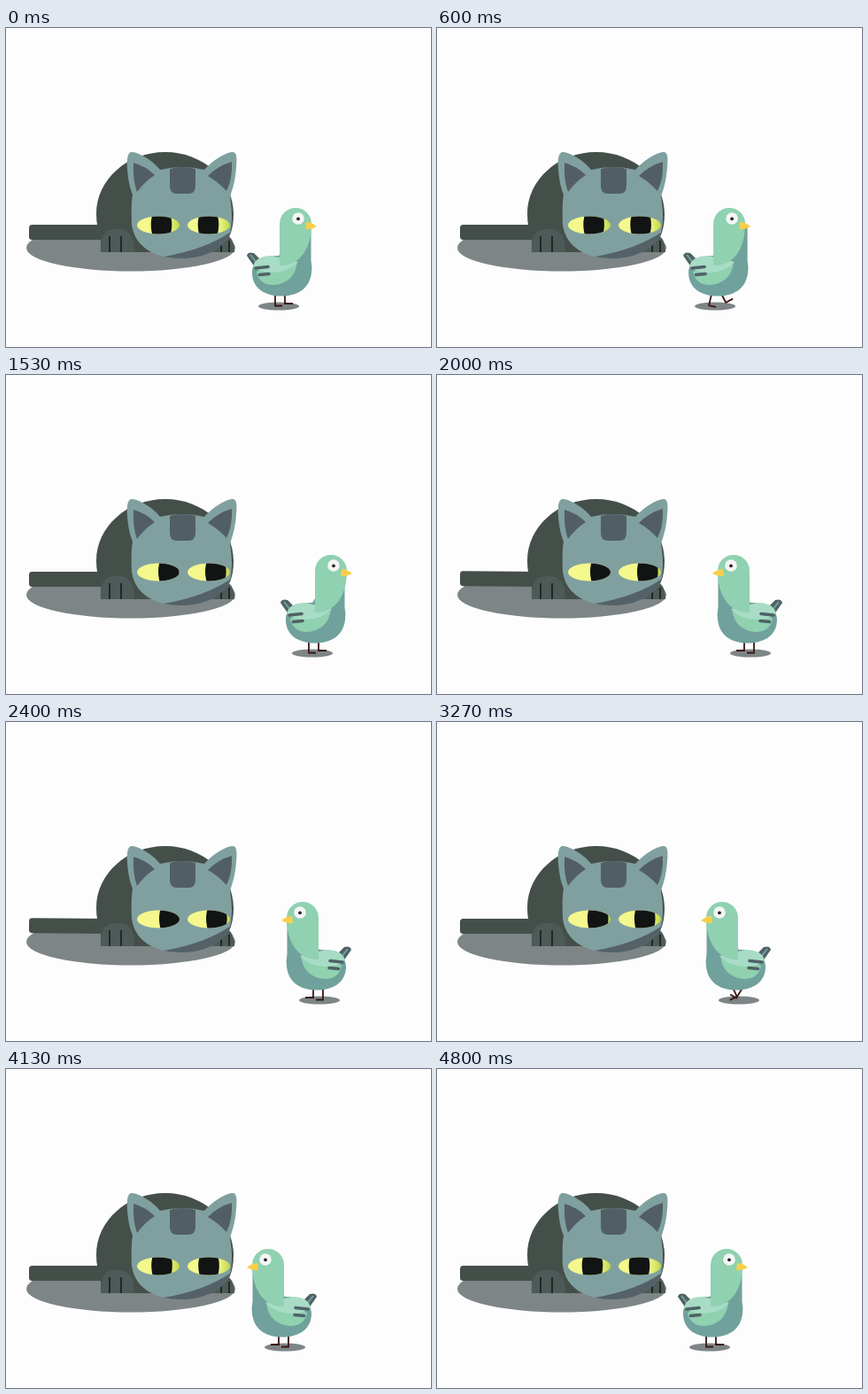
An HTML page that plays this animation: 480 by 360 pixels, repeating every 4.99 s.

```html
<!DOCTYPE html>
<html lang="en">
<head>
<meta charset="utf-8">
<title>Cat and pigeon</title>
<style>
html, body { margin: 0; width: 100%; height: 100%; overflow: hidden; background: #fdfdfd; }
svg { display: block; width: 100vw; height: 100vh; }
.leg { fill: none; stroke: #3a1614; stroke-width: 1.8; }
.quill { stroke: #4f6266; stroke-width: 3.6; stroke-linecap: round; }
</style>
</head>
<body>
<svg viewBox="0 0 480 360">
  <defs>
    <linearGradient id="iris">
      <stop offset=".72" stop-color="#f4f88c"/>
      <stop offset="1" stop-color="#c0d848"/>
    </linearGradient>
    <clipPath id="sockets">
      <ellipse cx="172" cy="222.5" rx="24" ry="10"/>
      <ellipse cx="229" cy="222.5" rx="24" ry="10"/>
    </clipPath>
  </defs>

  <g id="cat">
    <ellipse cx="141" cy="248" rx="118" ry="26.5" fill="#7d8586"/>
    <rect id="tail" x="26" y="222" width="100" height="17" rx="3.5" fill="#454f4a"/>
    <path fill="#454f4a" d="M107 253V236Q102 225 102 210C102 171 137 140 180 140C222 140 257 171 257 210Q257 225 252 236L258 253Z"/>
    <path fill="#4d5a58" d="M107 253Q105 228 122 227H130Q145 229 145 253ZM232 253Q234 234 249 234Q258 237 258 253Z"/>
    <path stroke="#202826" stroke-width="2" d="M117 235V253M130 235V253M243 238V253M252 240V253"/>
    <path fill="#80a0a0" d="M137 160C136 145 138 139 143 140C152 141 166 150 174 160Q199 154 224 160C233 150 246 141 255 140C261 139 261 147 260 158C259 172 256 182 253 190Q257 215 253 232C245 250 220 261 196 260C172 260 146 250 142 222Q141 198 143 188C139 178 138 170 137 160Z"/>
    <path fill="#546268" d="M178 258Q225 250 254 230C246 250 222 261 196 260Q186 260 178 258Z"/>
    <path fill="#525e65" d="M144 152Q158 156 168 166Q157 173 148 185Q143 172 144 152ZM255 151Q240 155 228 167Q240 174 249 184Q256 170 255 151ZM185 159Q199 155 214 159V178Q214 187 206 187H193Q185 187 185 178Z"/>
    <g clip-path="url(#sockets)">
      <rect x="148" y="210" width="48" height="25" fill="url(#iris)"/>
      <rect x="205" y="210" width="48" height="25" fill="url(#iris)"/>
      <g id="gaze" fill="#111413">
        <ellipse cx="175.5" cy="222" rx="11.8" ry="22"/>
        <ellipse cx="228.5" cy="222" rx="11.8" ry="22"/>
      </g>
    </g>
  </g>

  <g id="bird">
    <ellipse cy="314" rx="23" ry="4.5" fill="#7d8586"/>
    <path id="back" class="leg" d="M-4 300V313.5H4"/>
    <path id="front" class="leg" d="M7 300V311H16"/>
    <path fill="#4f6266" d="M-36 257Q-35 252 -28 254L-18 264L-27 270Z"/>
    <path stroke="#72a39f" stroke-width="2" d="M-32 256L-24 266"/>
    <path fill="#70a19c" d="M-30 276C-30 262 -16 257 0 257L20 225H36.5V262Q38 270 37 276C35 295 20 302.5 3 302.5C-18 302.5 -30 292 -30 276Z"/>
    <path fill="#90d1b0" d="M-25 275Q-22 290 -6 290Q18 288 21 264L-10 266Z"/>
    <path fill="#a8dcc6" d="M-29 269Q-26 257 -8 257L22 264Q12 275 -6 276Q-22 276 -29 269Z"/>
    <path class="quill" d="M-26 271L-12 269.5M-21.5 278.5L-11 277.5"/>
    <g id="head">
      <path fill="#8fd1b0" d="M1 268V221A18 18 0 0 1 37 221C37 246 26 269 1 268Z"/>
      <circle cx="22" cy="215" r="6.8" fill="#f4f5f4"/>
      <circle cx="22" cy="215.3" r="1.9" fill="#202524"/>
      <path fill="#f8cf4a" d="M31 219Q37 219 43 224Q37 228 30 227Z"/>
    </g>
  </g>
</svg>
<script>
const LOOP = 4990, TURN = 1800, TURN_BACK = 4800, STRIDE = 430;
const walks = [465, 2985];
const birdX = [[465, 308], [1310, 346], [1540, 346], [1720, 354], [2985, 354], [3845, 315]];
const gazeX = [[330, 0], [1000, 4], [1530, 8.3], [1870, 9.3], [2900, 9.3], [3270, 6.2], [3730, 2], [4270, 0]];
const headX = [[470, 0], [600, -3], [1200, -3], [1400, 0], [1530, 2], [1720, 0]];

const part = id => document.getElementById(id);
const move = (id, value) => part(id).setAttribute('transform', value);

// Linear interpolation through [time, value] points
function along(points, t) {
  if (t <= points[0][0]) return points[0][1];
  for (let i = 1; i < points.length; i++) {
    const [t0, a] = points[i - 1], [t1, b] = points[i];
    if (t < t1) return a + (b - a) * (t - t0) / (t1 - t0);
  }
  return points[points.length - 1][1];
}

function swing(t) {
  const start = walks.find(s => t >= s && t < s + 2 * STRIDE);
  if (start !== undefined) return Math.sin((t - start) / STRIDE * 2 * Math.PI);
  return t > 1540 && t < 1720 ? Math.sin((t - 1540) / 180 * Math.PI) : 0;
}

function draw(t) {
  const home = t >= TURN_BACK;
  const x = home ? 308 : along(birdX, t);
  const side = t >= TURN && !home ? -1 : 1;
  move('bird', `translate(${x} 0) scale(${side} 1)`);
  move('head', `translate(${along(headX, t)} 0)`);

  const s = swing(t);
  move('front', `rotate(${-30 * s} 7 300)`);
  move('back', `rotate(${(s > 0 ? 14 : 36) * s} -4 300)`);

  move('gaze', `translate(${along(gazeX, t)} 0)`);

  const lift = t > 1500 && t < 2900 ? Math.sin((t - 1500) / 1400 * Math.PI) : 0;
  move('tail', `rotate(${0.6 * lift} 120 231)`);
}

const begin = performance.now();
function tick() {
  draw((performance.now() - begin) % LOOP);
  requestAnimationFrame(tick);
}
tick();
</script>
</body>
</html>
```
